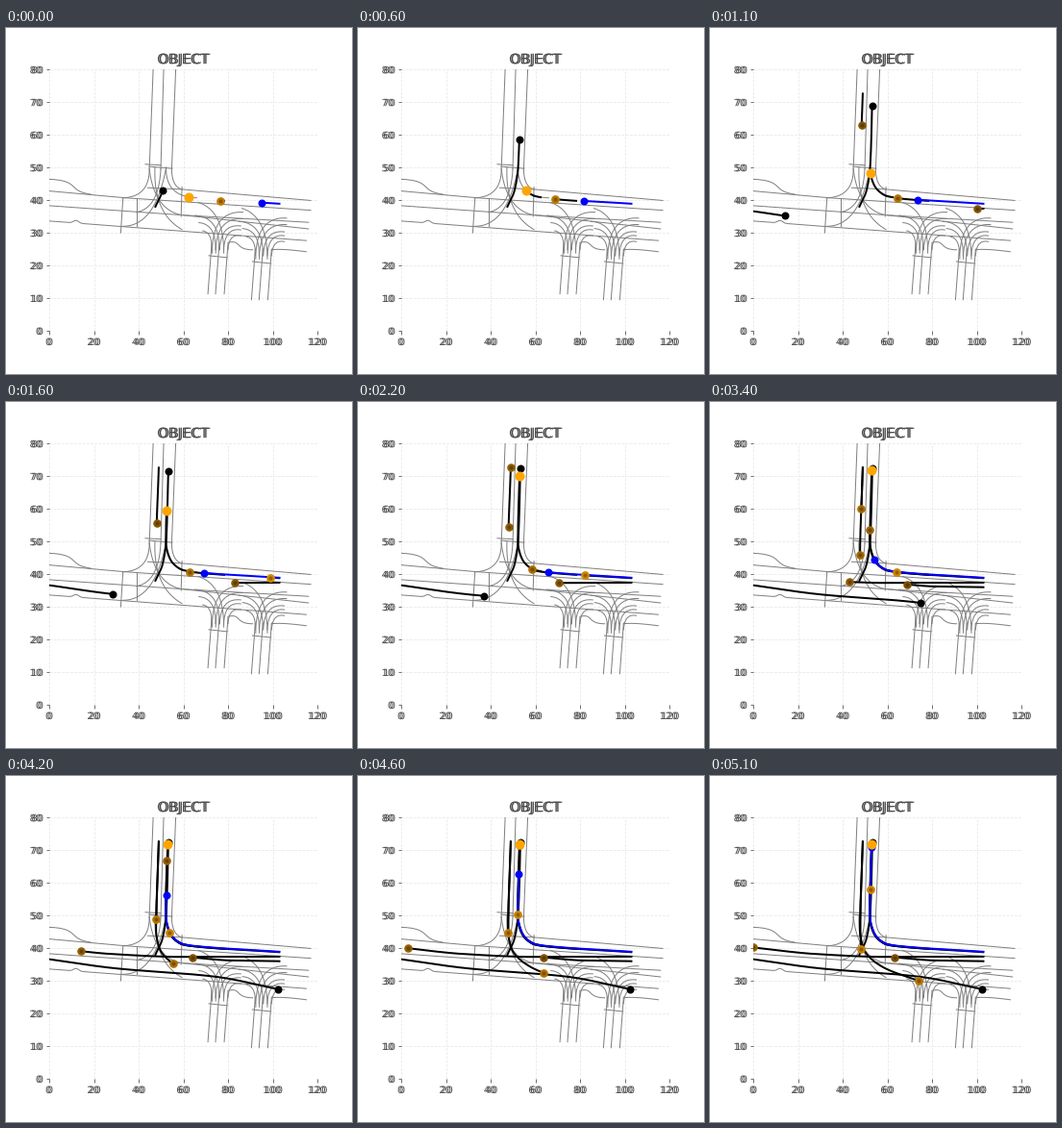
A matplotlib script that plays this animation: 360 px wide and 360 px high, repeating every 5.2 s.

```python
import numpy as np
import matplotlib.pyplot as plt
from matplotlib.animation import FuncAnimation
from matplotlib.patheffects import Stroke

FRAMES, INTERVAL = 52, 100
INK = "0.3"


def monotone(xs, ys, x):
    """Monotone cubic interpolation, held constant outside the keys."""
    xs, ys = np.asarray(xs, float), np.asarray(ys, float)
    h = np.diff(xs)
    d = np.diff(ys) / h
    m = np.concatenate([d[:1], np.zeros(len(xs) - 2), d[-1:]])
    for i in range(1, len(xs) - 1):
        if d[i - 1] * d[i] > 0:
            a, b = 2 * h[i] + h[i - 1], h[i] + 2 * h[i - 1]
            m[i] = (a + b) / (a / d[i - 1] + b / d[i])
    x = np.clip(x, xs[0], xs[-1])
    i = np.clip(np.searchsorted(xs, x, side="right") - 1, 0, len(xs) - 2)
    u = (x - xs[i]) / h[i]
    return ((1 + 2 * u) * (1 - u) ** 2 * ys[i] + u * (1 - u) ** 2 * h[i] * m[i]
            + u * u * (3 - 2 * u) * ys[i + 1] + u * u * (u - 1) * h[i] * m[i + 1])


def lengths(p):
    return np.concatenate([[0], np.cumsum(np.hypot(*np.diff(p, axis=0).T))])


def smooth(points, n=400):
    """Even samples of a soft curve through the points."""
    p = np.array(points, float)
    s = lengths(p)
    t = np.linspace(0, s[-1], n)
    return np.column_stack([monotone(s, p[:, 0], t), monotone(s, p[:, 1], t)])


fig = plt.figure(figsize=(5, 5), dpi=72, facecolor="white")
plt.rcParams["font.family"] = "DejaVu Sans"
ax = fig.add_axes([0.125, 0.125, 0.775, 0.755])
ax.set(xlim=(0, 120), ylim=(0, 80))
title = ax.set_title("OBJECT", fontsize=14.4, color=INK)
ax.set_axisbelow(True)
ax.grid(color="0.91", lw=0.8, ls="--")
ax.tick_params(labelsize=10, labelcolor=INK, color=INK)
for side in ax.spines.values():
    side.set_visible(False)

# All lettering is printed twice, slightly apart
double = [Stroke(offset=(dx, 0), linewidth=0) for dx in (-0.9, 0.9)]
for text in [title, *ax.get_xticklabels(), *ax.get_yticklabels()]:
    text.set_path_effects(double)


def line(*points):
    ax.plot(*zip(*points), color="gray", lw=1, zorder=1.5)


def turn(start, *rest):
    """Bezier curve with one or two control points."""
    pts = [np.array(p, float) for p in (start, *rest)]
    t = np.linspace(0, 1, 30)[:, None]
    pts = [p + 0 * t for p in pts]
    while len(pts) > 1:
        pts = [a + (b - a) * t for a, b in zip(pts, pts[1:])]
    line(*pts[0])


def draw_main_road():
    line((44, 43.8), (59.5, 43.3), (117, 39.9))
    line((0, 42.8), (34, 40.7), (117, 36.9))
    line((0, 38.3), (60, 35.4), (116, 33.2))
    line((60, 35.4), (116, 31.2))
    x = np.linspace(0, 115, 231)
    line(*zip(x, 33.6 - 0.052 * x + 0.8 * np.exp(-((x - 12) / 1.6) ** 2)))
    turn((0, 46.4), (14, 46), (8, 42.8), (18.5, 41.8))
    line((33, 40.7), (32, 30))
    line((39, 40.3), (39, 32))
    line((59.4, 44), (59, 35))


def draw_north_arm():
    for top, foot in ((46.5, 44.8), (51.2, 49.9), (56.6, 54.8)):
        line((top, 80), (foot, 49.5))
    line((43, 51), (50, 50.7))
    line((44.7, 50.3), (55, 49.7))
    turn((54.8, 49.5), (54.9, 44), (59.5, 43.3))
    turn((44.8, 49.5), (44.8, 41), (33, 40.7))
    turn((47.3, 50), (46.5, 36), (59.4, 31))
    turn((44.8, 49.5), (47, 37), (59.4, 35.4))
    turn((52.3, 50), (52, 41), (66, 40.7))
    turn((52.3, 50), (47.5, 32), (33, 32))
    turn((49.9, 49.5), (49, 37.5), (39, 36.3))


def draw_south_arm(x, y):
    """Side road with its mouth's left corner at (x, y)."""
    for dx in (0, 3.4, 7.3):
        line((x + dx, y + 3), (x + dx - 1.7, y - 12.5))
    line((x - 1.3, y - 0.8), (x + 7, y - 1.4))
    for dx, lane in ((0, 6.3), (1.7, 8.8), (3.4, 11)):
        turn((x + dx, y + 1), (x + dx + 0.3, y + lane), (x - 4 - dx, y + lane + 0.5))
    for dx, lane in ((0.2, 13), (1.8, 11)):
        turn((x + dx, y), (x + dx, y + lane), (x + 14, y + lane - 0.5))
    for dx, lane in ((3.6, 9), (5.4, 7.8), (7.3, 6)):
        turn((x + dx, y + 1), (x + dx + 0.4, y + lane), (x + 13, y + lane - 0.7))
    turn((x + 5.4, y), (x + 5.5, y + 13), (x - 6, y + 15.5))


draw_main_road()
draw_north_arm()
draw_south_arm(72.7, 23.8)
draw_south_arm(92.2, 22)
turn((80, 27), (86, 28), (83, 24.8), (91, 24.8))
turn((99.5, 24.8), (104, 25.2), (115, 24.2))


class Car:
    """A marker with a trail; keys are (frame, distance along the path)."""

    def __init__(self, path, keys, color="black", size=8, glow=None, z=3):
        self.path = smooth(path)
        self.dist = lengths(self.path)
        self.keys = np.array(keys).T
        self.glow = glow
        trail = "blue" if color == "blue" else "black"
        self.trail, = ax.plot([], [], color=trail, lw=2, zorder=z)
        self.dot, = ax.plot([], [], "o", color=color, ms=size, mew=0, zorder=z + 2)
        self.core, = ax.plot([], [], "o", ms=4, mew=0, zorder=z + 2)

    def show(self, frame):
        times, marks = self.keys
        live = frame >= times[0]
        for part in (self.trail, self.dot, self.core):
            part.set_visible(live)
        d = monotone(times, marks, frame)
        x, y = (np.interp(d, self.dist, c) for c in self.path.T)
        past = self.path[(self.dist >= marks[0]) & (self.dist <= d)]
        self.trail.set_data(*np.vstack([past, (x, y)]).T)
        self.dot.set_data([x], [y])
        if self.glow:
            level = np.interp(frame, [0, FRAMES - 1], self.glow)
            orange = np.array([1, 0.647, 0]) * level
            self.dot.set(color=orange, markersize=8 + level)
            self.core.set_data([x], [y])
            self.core.set_color(orange * 0.7)


TURN = np.array([(103, 38.9), (66, 40.6), (60, 41.2), (54.2, 44.5), (52.2, 50), (53, 72.3)])
BEHIND = TURN - 0.12
NORTH = [(47.5, 38), (50.7, 43), (52.3, 50), (53.3, 72.3)]
SOUTH = [(49, 72.6), (47.8, 45.5), (49.5, 39.7), (57, 34.6), (74, 30)]
DOWN = [(49, 72.6), (47.9, 46), (48.3, 39.8)]
WEST = [(103, 37.4), (61, 37.3), (28, 38.2), (0, 40.2)]
SHORT = [(103, 36), (82, 36.2), (63.3, 37.2)]
EAST = [(0, 36.6), (28.5, 33.9), (75, 31.2), (102.5, 27.4)]

CARS = [
    Car(NORTH, [(-4, 0), (0, 5.9), (11, 32), (18, 35.5)]),
    Car(EAST, [(6.8, 0), (16, 28.6), (27, 45.1), (34, 75.2), (42, 103)]),
    Car(SOUTH, [(6.5, 0), (16, 17.1), (27, 19.3), (34, 26.7), (51, 60)], glow=(0.45, 0.72)),
    Car(DOWN, [(22, 0), (27, 8.8), (34, 12.6), (42, 23.8), (51, 32.8)], glow=(0.4, 0.78)),
    Car(WEST, [(10.2, 0), (16, 20), (27, 42), (34, 60), (42, 89), (47, 103)], glow=(0.5, 0.6)),
    Car(SHORT, [(22.6, 0), (34, 34), (42, 39), (51, 39.8)], glow=(0.5, 0.5)),
    Car(BEHIND, [(-1.5, 24.5), (11, 38.5), (16, 40), (27, 50), (45, 77.5)], glow=(0.76, 0.55)),
    Car(BEHIND, [(14.5, 0), (27, 31.5), (34, 39), (51, 64)], glow=(0.84, 0.8)),
    Car(TURN, [(-3, 0), (0, 8), (11, 29.5), (27, 41), (42, 62), (51, 76.8)],
        color="blue", z=3.5),
    Car(TURN, [(0, 40.6), (11, 54.2), (16, 65.3), (23, 77.5)], color="orange", size=10, z=5),
]
CARS[-1].trail.set_zorder(3)


def draw(frame):
    for car in CARS:
        car.show(frame)
    return []


anim = FuncAnimation(fig, draw, frames=FRAMES, interval=INTERVAL, repeat=True)
plt.show()
```
